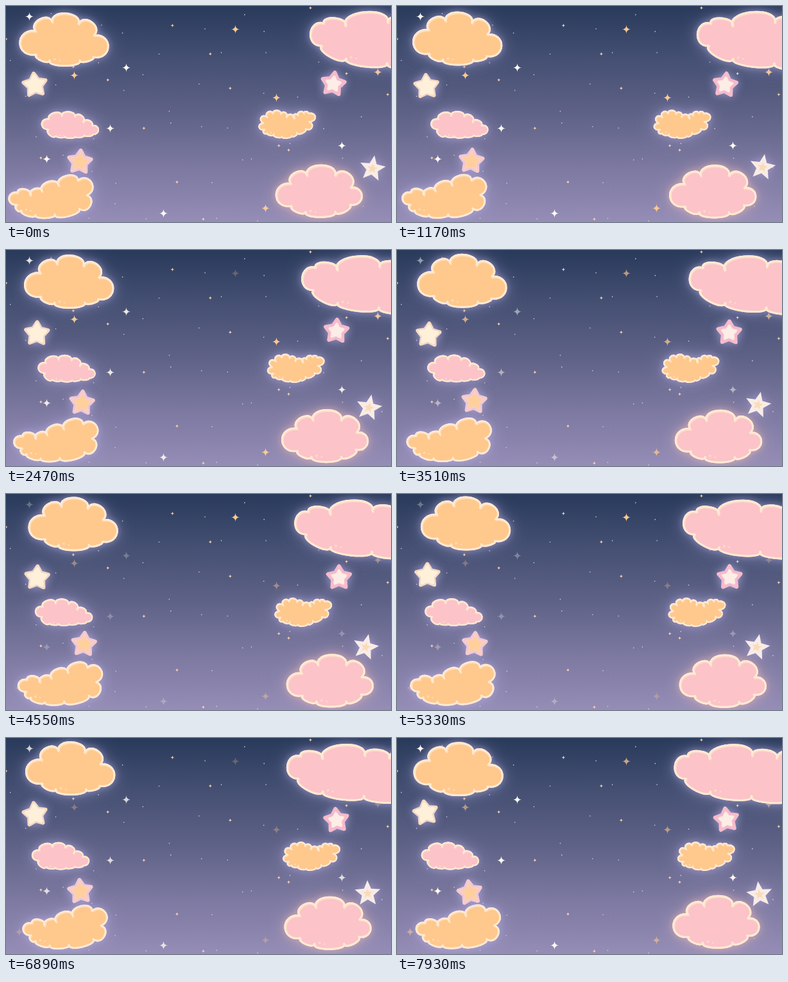
These frames come from a looping animation (600 by 338 pixels, 8000 ms). An HTML page with a canvas:

```html
<!DOCTYPE html>
<html lang="en">
<head>
<meta charset="utf-8">
<title>Night sky</title>
<style>
html, body { margin: 0; width: 100%; height: 100%; overflow: hidden; background: #2a3a5c; }
canvas { display: block; width: 100vw; height: 100vh; }
</style>
</head>
<body>
<canvas id="sky" width="600" height="338"></canvas>
<script>
const ctx = document.getElementById('sky').getContext('2d');
const LOOP = 8, STEP = .13, TURN = 5.33;  // seconds
const CREAM = '#ffead2', ORANGE = '#ffc88c', PINK = '#fcc3c8', WHITE = '#fffaf2', GOLD = '#ffc98f';
const LILAC = 'rgba(190,180,235,.6)', ROSE = 'rgba(225,180,185,.75)';

// Clouds: notches between the puffs, clockwise from the lower left.
// `v` is the drift in px/s, `back` the drift after TURN.
const clouds = [
  { fill: ORANGE, glow: LILAC, rim: 3, puff: 1, v: [3.1, -1.22], back: [-4.4, 1],
    notches: [[47, 76], [46, 39], [72, 25], [113, 28], [137, 46], [136, 80], [115, 85], [68, 85]] },
  { fill: PINK, glow: LILAC, rim: 3, puff: .8, v: [-5.24, .2],
    notches: [[492, 62], [495, 27], [529, 31], [595, 26], [633, 30], [690, 60], [660, 92],
      [594, 89], [530, 82]] },
  { fill: PINK, glow: LILAC, rim: 2.2, puff: 1, v: [-2.14, -.2],
    notches: [[66, 193], [67, 177], [87, 172], [107, 173], [120, 182], [134, 187], [135, 201],
      [122, 202], [108, 204], [92, 204], [78, 203]] },
  { fill: ORANGE, glow: LILAC, rim: 2.2, puff: 1.2, v: [5.5, 0],
    notches: [[403, 193], [401, 183], [407, 174], [416, 168], [428, 169], [437, 174], [449, 176],
      [455, 171], [464, 168], [471, 168], [472, 181], [467, 192], [453, 198], [445, 203],
      [430, 204], [417, 201], [407, 199]] },
  { fill: ORANGE, glow: LILAC, rim: 2.8, puff: 1, v: [3.2, -.35],
    notches: [[17, 311], [18, 292], [38, 296], [56, 290], [82, 281], [112, 273], [126, 296],
      [114, 317], [76, 326], [46, 327], [24, 320]] },
  { fill: PINK, glow: ROSE, rim: 3, puff: 1, v: [3.75, .56], back: [-4, -1.9],
    notches: [[445, 313], [444, 278], [469, 265], [513, 265], [537, 284], [536, 311],
      [513, 322], [467, 322]] }
];

// Stars swing between three poses [x, y, tilt]; the middle one is reached at `peak`
const stars = [
  { body: '#fddfbe', core: '#fff0da', size: .8, round: 6, peak: 3.6,
    poses: [[45, 123.5, -6], [49, 133, 4], [44.5, 117, -9]] },
  { body: '#fcbcc8', core: '#fcede6', size: .62, round: 6, peak: 4.7,
    poses: [[510, 122, 8], [519, 131, 0], [513.5, 128, -7]] },
  { body: '#fbcdcc', core: '#ffd09c', size: .6, round: 6, peak: 4.9,
    poses: [[115, 244, 5], [121.5, 235, 4], [113.5, 242, -8]] },
  { body: '#f8ece6', core: '#fbdbb6', size: .38, round: 0, peak: 4.9,
    poses: [[571, 254.5, 9], [560.3, 239.5, 13], [565, 245, -7]] }
];

const sparkles = [
  { color: WHITE, period: 8, at: [[36, 16], [187, 96], [162, 191], [63, 239], [245, 324], [523, 218]] },
  { color: GOLD, period: 10, at: [[106, 108], [421, 143], [404, 316], [579, 103], [20, 303]] },
  { color: GOLD, period: 4.3, at: [[357, 36]] }
];

const sky = ctx.createLinearGradient(0, 0, 0, 338);
['#293a5b', '#455073', '#5f6287', '#7d79a1', '#958db6']
  .forEach((c, i) => sky.addColorStop(i / 4, c));

// Small distant stars: one at a random place in each cell of a grid
let seed = 7;
const random = () => (seed = seed * 16807 % 2147483647) / 2147483647;
const dust = Array.from({ length: 66 }, (_, i) =>
  [(i % 11 + random()) * 600 / 11, (Math.floor(i / 11) + random()) * 338 / 6]);

// Joins the notches by arcs: fuller at the sides, flatter underneath
function cloudPath({ notches, puff }) {
  const path = new Path2D();
  path.moveTo(...notches[0]);
  notches.forEach(([x, y], i) => {
    const [x2, y2] = notches[(i + 1) % notches.length];
    const dx = x2 - x, dy = y2 - y, len = Math.hypot(dx, dy);
    const nx = dy / len, ny = -dx / len;
    const h = len * puff * (.27 + .4 * nx * nx - .09 * ny) / .75;
    const ox = nx * h, oy = ny * h, w = .12;
    path.bezierCurveTo(x + ox - dx * w, y + oy - dy * w, x2 + ox + dx * w, y2 + oy + dy * w, x2, y2);
  });
  path.closePath();
  return path;
}
clouds.forEach(c => c.path = cloudPath(c));

function disc(x, y, r) {
  ctx.beginPath();
  ctx.arc(x, y, r, 0, 2 * Math.PI);
  ctx.fill();
}

function drawCloud({ path, fill, glow, rim, v, back = v, notches }, t) {
  const out = Math.min(t, TURN), home = t - out;
  ctx.save();
  ctx.translate(v[0] * out + back[0] * home, v[1] * out + back[1] * home);
  ctx.lineJoin = 'round';
  ctx.lineWidth = rim;
  ctx.strokeStyle = CREAM;
  ctx.shadowColor = glow;
  ctx.shadowBlur = 24;
  ctx.fillStyle = fill;
  ctx.fill(path);
  ctx.shadowBlur = 8;
  ctx.stroke(path);
  ctx.shadowBlur = 0;
  ctx.fill(path);
  ctx.stroke(path);

  // Soft light inside the upper left edge, and two bubbles below
  ctx.clip(path);
  ctx.globalAlpha = .5;
  ctx.translate(rim * .4, rim * .5);
  ctx.stroke(path);
  ctx.fillStyle = CREAM;
  const [x, y] = notches[notches.length - 1];
  disc(x + rim * 2.2, y - rim, rim * .7);
  disc(x + rim * 4.8, y - rim * .4, rim * .5);
  ctx.restore();
}

// A round stroke softens the tips
function fillStar(r, color, round) {
  const path = new Path2D();
  for (let i = 0; i < 10; i++) {
    const a = i * Math.PI / 5;
    const d = (r - round / 2) * (i % 2 ? (round ? .56 : .45) : 1);
    path.lineTo(d * Math.sin(a), -d * Math.cos(a));
  }
  path.closePath();
  ctx.fillStyle = ctx.strokeStyle = color;
  ctx.lineJoin = 'round';
  ctx.lineWidth = round;
  if (round) ctx.stroke(path);
  ctx.fill(path);
  ctx.shadowBlur = 0;
}

function drawStar({ body, core, size, round, peak, poses }, t) {
  const [from, to, u] = t < peak
    ? [poses[0], poses[1], t / peak]
    : [poses[1], poses[2], (t - peak) / (LOOP - peak)];
  const ease = u * u * (3 - 2 * u);
  const [x, y, tilt] = from.map((p, i) => p + (to[i] - p) * ease);
  ctx.save();
  ctx.translate(x, y);
  ctx.rotate(tilt * Math.PI / 180);
  ctx.shadowColor = LILAC;
  ctx.shadowBlur = 14;
  fillStar(21, body, round);
  fillStar(21 * size, core, round * size);
  ctx.restore();
}

function sparkle(x, y, r) {
  const k = r * .08;
  ctx.beginPath();
  ctx.moveTo(x, y - r);
  for (const [sx, sy, ex, ey] of [[1, -1, r, 0], [1, 1, 0, r], [-1, 1, -r, 0], [-1, -1, 0, -r]])
    ctx.quadraticCurveTo(x + sx * k, y + sy * k, x + ex, y + ey);
  ctx.fill();
}

function draw(t) {
  ctx.fillStyle = sky;
  ctx.fillRect(0, 0, 600, 338);
  dust.forEach(([x, y], i) => {
    ctx.fillStyle = i % 4 ? '#dcd8e6' : '#ffd3a8';
    if (i % 4) disc(x, y, .8);
    else sparkle(x, y, 3);
  });
  for (const { color, period, at } of sparkles) {
    const wave = .75 + .5 * Math.cos(2 * Math.PI * (t / period - .1));
    ctx.globalAlpha = Math.min(1, wave);
    ctx.fillStyle = color;
    at.forEach(([x, y]) => sparkle(x + .5, y + .5, 6.5));
  }
  ctx.globalAlpha = 1;
  clouds.forEach(c => drawCloud(c, t));
  stars.forEach(s => drawStar(s, t));
}

const start = performance.now();
function frame() {
  const t = (performance.now() - start) / 1000 % LOOP;
  draw(Math.floor(t / STEP) * STEP);
  requestAnimationFrame(frame);
}
frame();
</script>
</body>
</html>
```
